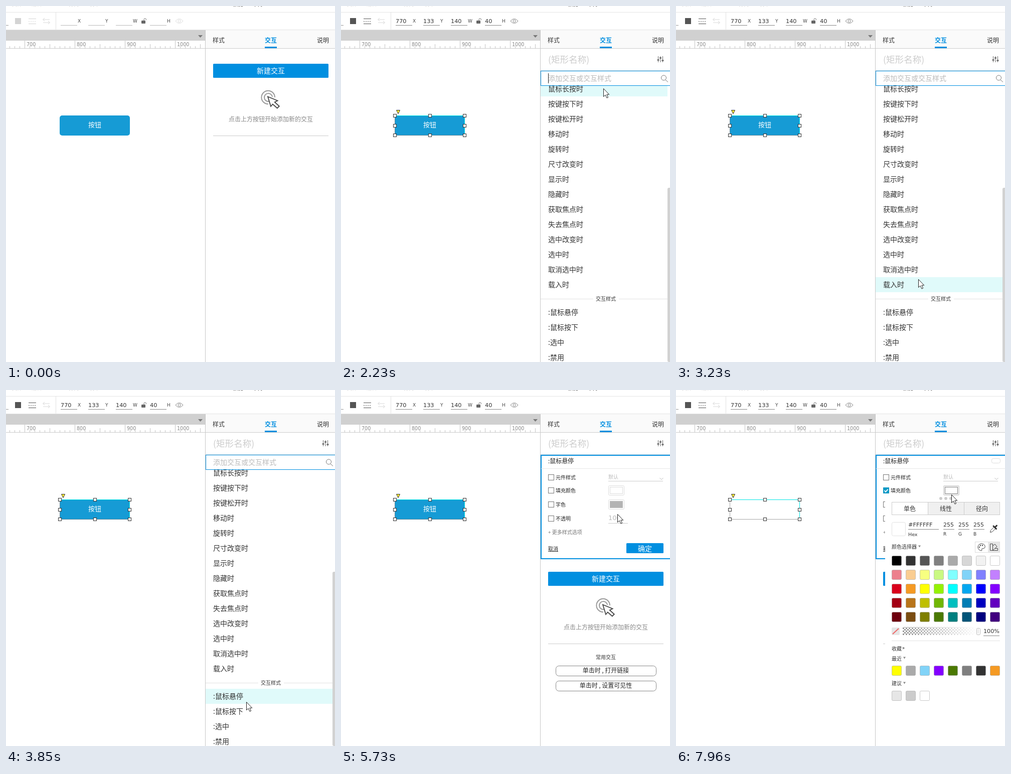
These frames come from a looping animation (656x709 px, 8000 ms). An HTML page:

```html
<!DOCTYPE html>
<html lang="zh-CN">
<head>
<meta charset="utf-8">
<title>交互样式</title>
<style>
html, body { margin: 0; width: 100%; height: 100%; overflow: hidden; background: #fff; }
svg { display: block; width: 656px; height: 709px; }
text { font-family: "Noto Sans CJK SC", "Noto Sans CJK", sans-serif; white-space: pre; }
.n { font-family: "DejaVu Sans", sans-serif; }
</style>
</head>
<body>
<svg id="stage" viewBox="0 0 656 709" xmlns="http://www.w3.org/2000/svg"></svg>
<script>
const BLUE = '#008fe0', INK = '#333';

// drawing helpers, each returns markup
const box = (x, y, w, h, fill, more = '') =>
  `<rect x="${x}" y="${y}" width="${w}" height="${h}" fill="${fill}" ${more}/>`;
const frame = (x, y, w, h, stroke, fill = '#fff', r = 0) =>
  box(x + .5, y + .5, w - 1, h - 1, fill, `stroke="${stroke}" rx="${r}"`);
const path = (d, stroke, fill = 'none', w = 1, more = '') =>
  `<path d="${d}" stroke="${stroke}" fill="${fill}" stroke-width="${w}" ${more}/>`;
const label = (x, cy, size, str, fill = INK, more = '') =>
  `<text x="${x}" y="${cy + size * .37}" font-size="${size}" fill="${fill}" ${more}>${str}</text>`;
const mid = (x, cy, size, str, fill, more = '') =>
  label(x, cy, size, str, fill, 'text-anchor="middle" ' + more);
const num = (x, cy, size, str, fill = INK) => label(x, cy, size, str, fill, 'class="n"');
const group = (id, body, more = '') => `<g id="${id}" ${more}>${body}</g>`;
const each = (list, fn) => list.map(fn).join('');
const down = (x, y) => path(`M${x - 2.5} ${y - 2}h5l-2.5 4z`, 'none', '#888');

function toolbar() {
  const tops = each([[12, '文件'], [51, '编辑'], [125, '排列'], [166, '发布']],
    ([x, s]) => label(x, -3.5, 10, s, '#ccc'));
  const fields = each([[109, 'X'], [164, 'Y'], [219, 'W'], [287, 'H']], ([x, s]) =>
    box(x, 38, 33, 1, '#bbb') + num(x + 34, 30, 9, s, '#444'));
  return tops + label(453, -3.5, 10, '预览') + label(495, -3.5, 10, '共享') +
    box(0, 12, 656, 1, '#e4e4e4') + box(99, 13, 1, 34, '#e0e0e0') + box(0, 47, 656, 1, '#e4e4e4') +
    fields +
    path('M77 24l-3.500 3 3.500 3M74 27h13M84 30l3.500 3-3.500 3M87 33h-13', '#d8d8d8') +
    box(270, 29, 8, 6, '#666', 'rx="1"') + path('M275 29v-2a2.200 2.200 0 0 1 4.400 0v1', '#777') +
    group('tools', box(18, 24, 12, 12, 'currentColor') +
      path('M45 25.500h15M45 35.500h15', 'currentColor') +
      path('M45 30.500h15', 'currentColor', 'none', 1, 'stroke-dasharray="2 2"') + box(0, 38, 5, 1, '#999')) +
    group('eye', path('M338 30q7.500-9 15 0q-7.500 9-15 0z', 'currentColor') +
      '<circle cx="345.500" cy="30" r="2.500" fill="none" stroke="currentColor"/>') +
    group('values', each([[109, 770], [164, 133], [219, 140], [287, 40]],
      ([x, v]) => num(x, 29.5, 11.3, v) + box(x, 38, 33, 1, '#888')));
}

function ruler() {
  let s = box(0, 48, 397, 21, '#d0d0d0') + path('M383 58h9l-4.500 5z', 'none', '#777');
  for (let x = 7; x < 397; x += 10) {
    const k = (x - 37) / 10, top = k % 10 === 0 ? 69 : k % 5 === 0 ? 76 : 80;
    s += box(x, top, 1, 84 - top, '#c4c4c4');
  }
  for (let i = 0; i < 4; i++) s += num(41 + i * 100, 76.5, 9.6, 700 + i * 100, '#888');
  return s + box(0, 84, 397, 1, '#ccc');
}

function tabs() {
  return box(398, 48, 258, 36, '#fafafa') + box(397, 48, 1, 661, '#c8c8c8') +
    box(398, 84, 258, 1, '#ccc') + label(412, 69, 12, '样式') +
    label(516, 69, 12, '交互', BLUE, 'font-weight="700"') + label(620, 69, 12, '说明') +
    box(516, 81, 24, 3, BLUE);
}

function canvas() {
  const handles = each([[107, 218], [177, 218], [246, 218], [107, 238], [246, 238], [107, 257], [177, 257], [246, 257]],
    ([x, y]) => frame(x - 3, y - 3, 7, 7, '#333'));
  return box(107, 218, 140, 40, '#169bd5', 'id="shape" rx="5"') +
    mid(177, 236.5, 13, '按钮', '#fff') +
    group('hover', frame(107, 218, 140, 40, '#00e0e0', 'none', 4)) +
    group('picked', path('M107.500 218v39.500H247', 'rgba(130,130,130,.7)') +
      path('M107 218.500H246.500V258', '#00e5e5') + handles +
      path('M110.500 207.500h7l-3.500 7z', '#333', '#ffee30'));
}

function starter() {
  const pill = (y, s, id) => group(id, frame(428, y, 201, 21, '#888', '#fff', 6) + mid(528, y + 10, 12, s, '#222'));
  return box(413, 115, 230, 28, BLUE, 'rx="1.500"') + mid(528, 129, 14, '新建交互', '#fff') +
    path('M536 182a13.300 13.300 0 1 0-13 13.300M531 181a8 8 0 1 0-7 9', '#999', 'none', 2) +
    path('M522 180.500l6 19.500 3.800-4.500 9 8 4-4-9-8 5.700-3z', '#444', '#fff', 1.8) +
    mid(528, 226, 12, '点击上方按钮开始添加新的交互', '#888') + box(413, 258, 230, 1, '#ccc') +
    group('common', mid(528, 285.5, 10, '常用交互', '#777', 'font-weight="700"') +
      pill(302, '单击时 , 打开链接', 'p1') + pill(332, '单击时 , 设置可见性', 'p2') +
      pill(362, '鼠标悬停交互样式', 'p3'));
}

function nameRow() {
  return label(413, 106.5, 17.6, '(矩形名称)', '#ccc') + box(398, 128, 258, 1, '#e0e0e0') +
    path('M632.500 100v12M637 100v12M641.500 100v12', '#666') +
    path('M630.500 107.500h4M635 103.500h4M639.500 108.500h4', '#555', 'none', 2);
}

const EVENTS = ('单击时 双击时 鼠标右击时 鼠标按下时 鼠标松开时 鼠标移动时 鼠标移入时 鼠标移出时 鼠标停放时 ' +
  '鼠标长按时 按键按下时 按键松开时 移动时 旋转时 尺寸改变时 显示时 隐藏时 获取焦点时 失去焦点时 ' +
  '选中改变时 选中时 取消选中时 载入时').split(' ');
const STYLES = [':鼠标悬停', ':鼠标按下', ':选中', ':禁用'];
const SCROLL = 307;
// row centres in the fully scrolled position
const rowY = i => i < EVENTS.length ? 165 + (i - 9) * 30 : 610 + (i - EVENTS.length) * 30;
const ROWS = [...EVENTS, ...STYLES];

function menu() {
  const head = (y, s) => box(398, y, 105, 1, '#e2e2e2') + box(554, y, 97, 1, '#e2e2e2') + mid(528, y, 10, s);
  return box(398, 129, 258, 580, '#fff') +
    '<clipPath id="view"><rect x="398" y="159" width="258" height="550"/></clipPath>' +
    `<g clip-path="url(#view)">${box(398, 0, 253, 30, '#e0fafa', 'id="row"')}` +
    group('rows', head(-134, '交互事件') + each(ROWS.map((s, i) => [s, rowY(i)]), ([s, y]) => label(413, y, 14, s)) +
      head(583, '交互样式')) +
    box(651, 362, 8, 347, '#d2d2d2', 'id="thumb" rx="3"') + '</g>' +
    frame(398, 129, 262, 30, BLUE) + label(413, 143.5, 14, '添加交互或交互样式', '#bbb') +
    box(413, 134, 1, 20, '#222', 'id="caret"') +
    '<circle cx="643.500" cy="143" r="5" fill="none" stroke="#777"/>' + path('M647 147l5 4.500', '#777');
}

function styleForm() {
  const check = (cy, s) => frame(413, cy - 6, 12, 12, '#777') + label(428, cy + .5, 10, s, '#222');
  const swatch = (y, edge, fill) => frame(533, y, 32, 20, '#ddd', '#fff', 2) + frame(536, y + 3, 26, 14, edge, fill);
  return box(399, 130, 262, 206, '#fff', `stroke="${BLUE}" stroke-width="2"`) +
    label(413, 142, 12, ':鼠标悬停', '#222') + box(399, 156, 257, 1, '#e6e6e6') +
    check(174, '元件样式') + check(200, '填充颜色') + check(228, '字色') + check(256, '不透明') +
    label(533, 173, 10, '默认', '#bbb') + box(533, 181, 109, 1, '#ccc') + path('M635.500 175l3.500 3.500 3.500-3.500', '#bbb') +
    swatch(190, '#ddd', '#fff') + swatch(218, '#bbb', '#b3b3b3') +
    num(533, 254, 13, '100', '#bbb') + box(533, 265, 39, 1, '#ccc') +
    label(413, 283, 10, '+ 更多样式选项', '#777') +
    label(413, 316.5, 10, '取消', '#222') + box(413, 321, 20, 1, '#333') +
    box(569, 305, 74, 20, BLUE, 'rx="1.500"') + mid(606, 315.5, 14, '确定', '#fff') +
    group('ticked', box(413, 194, 12, 12, '#0f9ac6', 'rx="1"') + path('M415.500 200l2.500 2.800 4.500-5', '#fff', 'none', 1.8) +
      frame(629, 136, 18, 10, '#ddd', '#fff', 3));
}

const PALETTE = [
  '000 333 555 808080 aaa d7d7d7 f2f2f2 fff',
  'ec808d facd91 f7ff80 caf982 80ffff 81d3f8 8080ff c280ff',
  'd9001b f59a23 ff0 95f204 0ff 02a7f0 00f 8400ff',
  'a30014 b8741a bfbf00 70b603 00bfbf 027db4 0000bf 6300bf',
  '6d000e 7b4d12 7f7f00 4b7902 007f7f 015478 00007f 42007f'];

function picker() {
  const chips = (y, list) => each(list.split(' ').map((c, i) => [c, 430 + i * 28]),
    ([c, x]) => frame(x, y, 20, 20, 'rgba(150,150,150,.5)', '#' + c, 2));
  const rgb = each([['R', 533], ['G', 563], ['B', 593]], ([s, x]) =>
    num(x, 268, 11, 255) + box(x, 277, 22, 1, '#888') + num(x, 287, 9, s));
  return frame(533, 190, 32, 20, '#ccc', '#eee', 2) + frame(536, 193, 26, 14, '#888') +
    box(417, 211, 239, 408, '#fff') +
    each([528, 538, 548], x => `<circle cx="${x}" cy="216" r="3" fill="#ccc"/>`) +
    frame(430, 223, 216, 26, '#ccc', '#f0f0f0') + frame(430, 223, 73, 26, '#ccc') + box(574, 223, 1, 26, '#ccc') +
    mid(466, 236.5, 12, '单色') + mid(538, 236.5, 12, '线性') + mid(610, 236.5, 12, '径向') +
    frame(430, 263, 28, 28, '#e2e2e2', '#fff', 3) +
    num(463, 268, 11.3, '#FFFFFF') + box(463, 277, 61, 1, '#888') + num(463, 287, 9.5, 'Hex') + rgb +
    path('M626.500 283.500l1-4 7-7 3 3-7 7z', '#444') + path('M633 271l5.500 5.500M636 273.500l3.500-3.500', '#333', 'none', 3, 'stroke-linecap="round"') +
    label(430, 312.5, 10, '颜色选择器') + down(485.5, 311.5) +
    frame(596, 302, 50, 22, '#ddd') + box(622, 303, 23, 20, '#e6e6e6') +
    path('M609 306a7 7 0 1 0 0 14c2 0 0-3 1-4s5 1 6-3-3-7-7-7z', '#444') +
    each([[605, 313], [607, 309.5], [611, 309.5]], ([x, y]) => `<circle cx="${x}" cy="${y}" r="1.200" fill="#444"/>`) +
    path('M626.500 306.500h5v13h-5zM632 310l4-3 4 5-8 7M636 315.500h5.500v4h-12', '#444') +
    each(PALETTE.map((c, i) => [330 + i * 28, c]), ([y, c]) => chips(y, c)) +
    box(430, 473, 16, 15, '#e6e6e6', 'rx="2"') + path('M432 486l12-11', '#f06a6a', 'none', 2) +
    '<pattern id="tile" width="6" height="6" patternUnits="userSpaceOnUse" x="452" y="473">' +
    box(0, 0, 6, 6, '#fff') + box(0, 0, 3, 3, '#999') + box(3, 3, 3, 3, '#999') + '</pattern>' +
    '<linearGradient id="fade"><stop stop-color="#fff" stop-opacity="0"/><stop offset="1" stop-color="#fff"/></linearGradient>' +
    box(452, 472, 148, 16, 'url(#tile)') + box(452, 472, 148, 16, 'url(#fade)') +
    frame(599, 474, 8, 14, '#bbb', '#fff', 2) + box(602, 476, 1, 9, '#ccc') +
    num(613, 480, 11.2, '100%') + box(613, 489, 32, 1, '#888') + box(430, 499, 216, 1, '#e2e2e2') +
    label(430, 515, 10, '收藏') + path('M452 511.500v5l4.500-2.500z', 'none', '#888') +
    label(430, 535, 10, '最近') + down(455.5, 533.5) + chips(549, 'ff0 aaa 81d3f8 8400ff 4b7902 7f7f7f 333 f59a23') +
    label(430, 584.5, 10, '建议') + down(455.5, 583.5) + chips(599, 'e6e6e6 ccc fff');
}

document.getElementById('stage').innerHTML = box(0, 0, 656, 709, '#fff') + toolbar() + ruler() + tabs() + canvas() +
  group('starter', starter()) + group('name', nameRow()) + group('menu', menu()) +
  group('form', styleForm()) + group('picker', picker()) +
  group('arrow', path('M.5 .5v16l3.700-3.300 2.800 6 2.600-1.200-2.700-5.800h4.800z', '#222', '#fff')) +
  group('cross', path('M0-10.500l4 4.500h-2.500v4.500h4.500v-2.500l4.500 4-4.500 4v-2.500h-4.500v4.500h2.500l-4 4.500-4-4.500h2.500v-4.500h-4.500v2.500l-4.500-4 4.500-4v2.500h4.500v-4.500h-2.500z', '#222', '#fff'));

const el = {};
document.querySelectorAll('[id]').forEach(e => el[e.id] = e);
const show = (id, on) => el[id].setAttribute('visibility', on ? 'inherit' : 'hidden');
const shift = (id, x, y) => el[id].setAttribute('transform', `translate(${x} ${y})`);

// share of a move done at t, made in n equal jumps, the first at a and the last at b
function done(t, a, b, n) {
  const k = n > 1 ? Math.floor((t - a) / (b - a) * (n - 1) + .1) : 0;
  return t < a ? 0 : Math.min(1, (k + 1) / n);
}

// pointer moves: start, end, jumps, points at even shares
const MOVES = [
  [290, 920, 9, [515, 735], [455, 600], [260, 330], [167, 240]],
  [1540, 1923, 6, [167, 240], [197, 231], [275, 212], [375, 190], [460, 172], [510, 165], [523, 164]],
  [2380, 2840, 7, [523, 164], [500, 340], [486, 478]],
  [2920, 3150, 4, [486, 478], [484, 525]],
  [3230, 3530, 5, [484, 525], [479, 621]],
  [4250, 4330, 2, [479, 621], [474, 613]],
  [4780, 5260, 7, [474, 613], [440, 400], [380, 261], [268, 414]],
  [5410, 5730, 5, [268, 414], [430, 310], [551, 247]],
  [5880, 6650, 11, [551, 247], [470, 222], [420, 202], [415, 199]],
  [6960, 7500, 8, [415, 199], [480, 202], [549, 201]],
  [7960, 7961, 1, [549, 201], [549, 208]]];

function pointer(t) {
  const [a, b, n, ...pts] = MOVES.filter(m => t >= m[0]).pop() || MOVES[0];
  const p = done(t, a, b, n) * (pts.length - 1), i = Math.min(Math.floor(p), pts.length - 2), f = p - i;
  return [0, 1].map(c => Math.round(pts[i][c] + (pts[i + 1][c] - pts[i][c]) * f));
}

function draw(t) {
  const [x, y] = pointer(t);
  const over = x > 107 && x < 247 && y > 218 && y < 258;
  const picked = t >= 1230, panel = t >= 1305;
  const menuOn = t >= 1915 && t < 4475, form = t >= 4625, ticked = t >= 6725;

  show('arrow', t >= 290 && !over);
  show('cross', t >= 290 && over);
  shift('arrow', x, y);
  shift('cross', x, y);

  show('picked', picked);
  show('hover', over && t >= 290 && !picked);
  show('values', picked);
  el.tools.setAttribute('color', picked ? '#555' : '#d4d4d4');
  el.eye.setAttribute('color', picked ? '#888' : '#ddd');
  el.shape.setAttribute('fill', ticked ? '#fff' : '#169bd5');

  show('name', panel);
  show('common', panel);
  show('p3', t < 4475);
  shift('starter', 0, form ? 247 : panel ? 34 : 0);

  show('menu', menuOn);
  if (menuOn) {
    const off = SCROLL * (1 - done(t, 2000, 2230, 4));
    shift('rows', 0, off);
    el.thumb.setAttribute('y', 362 - off * 203 / SCROLL);
    const hit = ROWS.findIndex((_, i) => Math.abs(rowY(i) + off - y - .1) < 15);
    show('row', hit >= 0);
    if (hit >= 0) el.row.setAttribute('y', rowY(hit) + off - 15);
    show('caret', t < 2790 || (t - 2790) % 1060 >= 530);
  } else {
    show('row', false);
    show('caret', false);
  }

  show('form', form);
  show('ticked', form && ticked);
  show('picker', t >= 7580);
}

function tick() {
  draw(performance.now() % 8000);
  requestAnimationFrame(tick);
}
tick();
</script>
</body>
</html>
```
